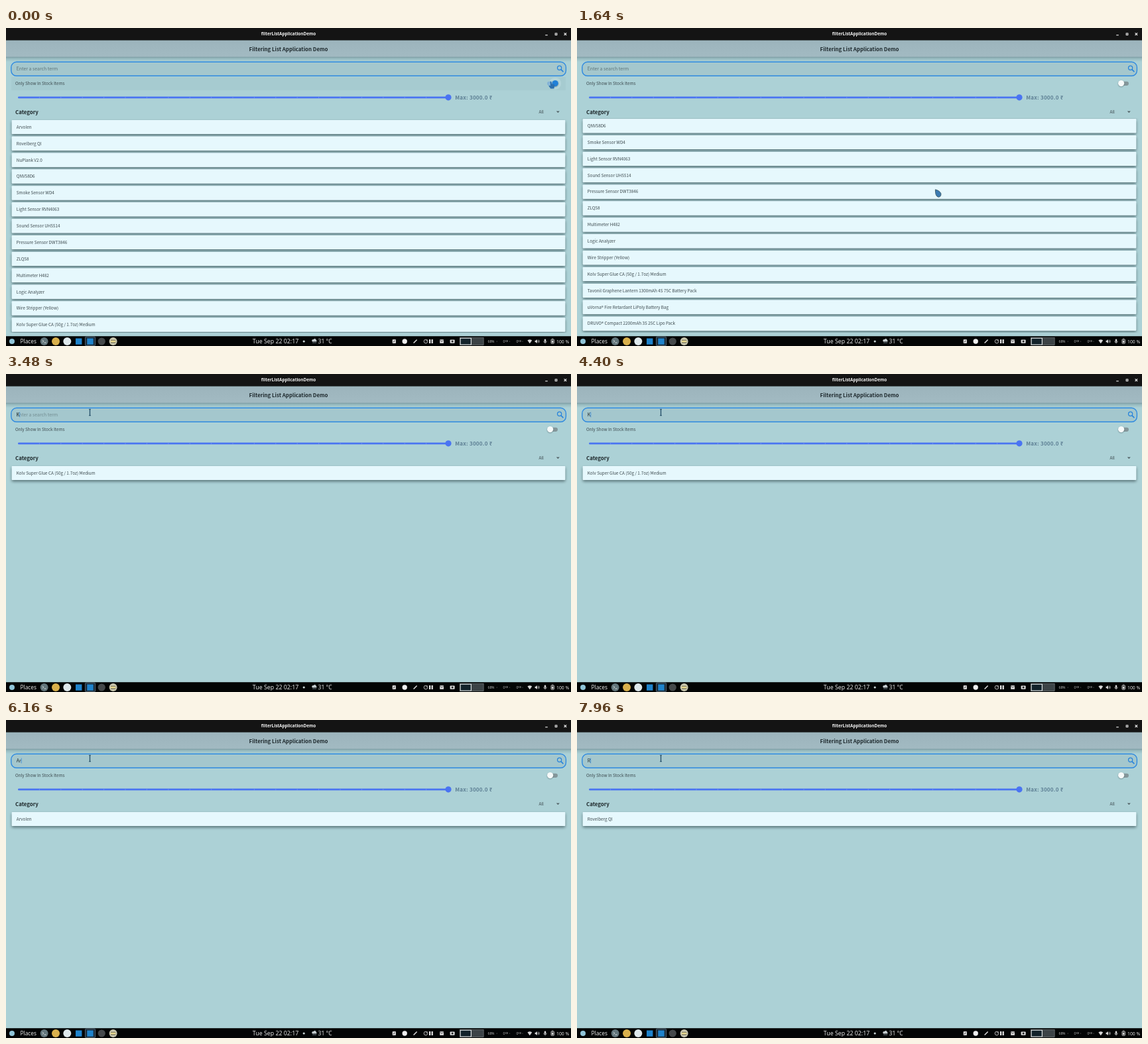
An HTML page with a canvas that plays this animation: 852x480 px, repeating every 8 s.

```html
<!DOCTYPE html>
<html lang="en">
<head>
<meta charset="utf-8">
<title>filterListApplicationDemo</title>
<style>
html, body { margin: 0; width: 100%; height: 100%; overflow: hidden; background: #acd1d6; }
canvas { display: block; width: 852px; height: 480px; }
</style>
</head>
<body>
<canvas id="stage"></canvas>
<script>
const W = 852, H = 480, LOOP = 8000;
const APP = '"Noto Sans CJK JP", "Noto Sans CJK SC", "Noto Sans", sans-serif';
const SYS = '"Noto Sans", "Open Sans", sans-serif';
const BLUE = '#4a74f2', INK = '#3b484c';

const items = [
  'Arvolen', 'Rovelberg QI', 'NuPlank V2.0', 'QNV58D6', 'Smoke Sensor WD4',
  'Light Sensor RVN4063', 'Sound Sensor UH5514', 'Pressure Sensor DWT3846',
  'ZLQ58', 'Multimeter H482', 'Logic Analyzer', 'Wire Stripper (Yellow)',
  'Kolv Super Glue CA (50g / 1.7oz) Medium',
  'Tavonil Graphene Lantern 1300mAh 4S 75C Battery Pack',
  'uVorna\u00ae Fire Retardant LiPoly Battery Bag',
  'DRUVO\u00ae Compact 2200mAh 3S 25C Lipo Pack'
];
const ROW = 24.87, SCROLL_END = 76.4;

// [time, query]
const typing = [
  [0, ''], [3420, 'K'], [5560, ''], [5880, 'A'], [6080, 'Ar'],
  [7000, 'A'], [7160, ''], [7560, 'R']
];
// [time, x, y]
const path = [
  [0, 822, 82], [160, 822, 82], [560, 545, 246], [1600, 545, 246],
  [2300, 127, 81], [2560, 127, 81], [2760, 126.5, 58]
];

const canvas = document.getElementById('stage');
const dpr = window.devicePixelRatio || 1;
canvas.width = W * dpr;
canvas.height = H * dpr;
const c = canvas.getContext('2d');

const clamp = v => Math.max(0, Math.min(1, v));
const ease = v => { v = clamp(v); return v * v * (3 - 2 * v); };
const span = (t, a, b) => ease((t - a) / (b - a));

function rect(x, y, w, h, color) {
  c.fillStyle = color;
  c.fillRect(x, y, w, h);
}

function round(x, y, w, h, r, fill, stroke, line = 1) {
  c.beginPath();
  c.roundRect(x, y, w, h, r);
  if (fill) { c.fillStyle = fill; c.fill(); }
  if (stroke) { c.strokeStyle = stroke; c.lineWidth = line; c.stroke(); }
}

function disc(x, y, r, fill) {
  c.beginPath();
  c.arc(x, y, r, 0, Math.PI * 2);
  c.fillStyle = fill;
  c.fill();
}

function lines(color, width, ...paths) {
  c.strokeStyle = color;
  c.lineWidth = width;
  c.beginPath();
  for (const p of paths)
    for (let i = 0; i < p.length; i += 2) i ? c.lineTo(p[i], p[i + 1]) : c.moveTo(p[0], p[1]);
  c.stroke();
}

function poly(color, ...p) {
  c.beginPath();
  for (let i = 0; i < p.length; i += 2) c.lineTo(p[i], p[i + 1]);
  c.closePath();
  c.fillStyle = color;
  c.fill();
}

function text(s, x, y, size, color, { bold = false, font = APP, align = 'left' } = {}) {
  c.font = `${bold ? 'bold ' : ''}${size}px ${font}`;
  c.textAlign = align;
  c.fillStyle = color;
  c.fillText(s, x, y);
}

function queryAt(t) {
  let i = 0;
  while (i + 1 < typing.length && typing[i + 1][0] <= t) i++;
  let start = i;
  while (start > 0 && !typing[start - 1][1] === !typing[i][1]) start--;
  const fade = start ? clamp((t - typing[start][0]) / 200) : 1;
  const query = typing[i][1];
  return { query, hint: query ? 1 - fade : fade };
}

function pointerAt(t) {
  let i = 0;
  while (i + 1 < path.length && path[i + 1][0] <= t) i++;
  const a = path[i], b = path[i + 1];
  if (!b) return [a[1], a[2]];
  const k = span(t, a[0], b[0]);
  return [a[1] + (b[1] - a[1]) * k, a[2] + (b[2] - a[2]) * k];
}

function drawTitleBar() {
  rect(0, 0, W, 18.6, '#141414');
  text('filterListApplicationDemo', 426, 11.4, 6.4, '#f4f4f4', { bold: true, font: SYS, align: 'center' });
  rect(813.2, 10.2, 3.6, 1.1, '#eee');
  c.strokeStyle = '#eee';
  c.lineWidth = 1.1;
  c.strokeRect(828.2, 8, 2.6, 2.6);
  lines('#eee', 1.1, [841.6, 7.4, 845.2, 11], [845.2, 7.4, 841.6, 11]);
}

function drawAppBar() {
  const shade = c.createLinearGradient(0, 43, 0, 51);
  shade.addColorStop(0, 'rgba(70,98,106,.55)');
  shade.addColorStop(0.4, 'rgba(70,98,106,.2)');
  shade.addColorStop(1, 'rgba(70,98,106,0)');
  rect(0, 43, W, 8, shade);
  const bar = c.createLinearGradient(0, 18, 0, 44);
  bar.addColorStop(0, '#9cb4bc');
  bar.addColorStop(1, '#a2bac2');
  rect(0, 18.6, W, 25, bar);
  text('Filtering List Application Demo', 426, 34.5, 7.86, '#1f2a2e', { bold: true, align: 'center' });
}

function drawSearch(t) {
  const { query, hint } = queryAt(t);
  round(7.8, 51.3, 836.6, 21, 8, '#a4c7cd', '#2f8ae0', 1.4);
  if (hint > 0) {
    c.globalAlpha = hint;
    text('Enter a search term', 15.7, 63.9, 6.93, '#5d7479');
    c.globalAlpha = 1;
  }
  if (query) text(query, 15.7, 63.9, 6.93, '#222e32');
  if (t > 2900) {
    c.font = `6.93px ${APP}`;
    rect(15.9 + c.measureText(query).width, 57.4, 0.8, 8, '#3b8bd8');
  }
  c.beginPath();
  c.arc(834.6, 60.3, 3.1, 0, Math.PI * 2);
  c.strokeStyle = '#2482dc';
  c.lineWidth = 1.2;
  c.stroke();
  lines('#2482dc', 1.5, [836.9, 62.6, 840.4, 66.1]);
}

function drawSwitch(t, hover) {
  if (hover) rect(8, 74, 836, 20, 'rgba(70,100,105,.05)');
  text('Only Show In Stock Items', 14, 86.2, 6.34, INK);
  const on = 1 - span(t, 60, 240);
  const x = 820.6 + 7.6 * on;
  round(816, 80.7, 16, 6.2, 3.1, on > 0.5 ? '#83b2d6' : '#83969a');
  if (on > 0) disc(x, 83.7, 9, `rgba(225,242,246,${0.25 * on})`);
  c.save();
  c.shadowColor = 'rgba(40,60,65,.5)';
  c.shadowBlur = 2 * dpr;
  c.shadowOffsetY = 0.7 * dpr;
  disc(x, 83.6, 4.6, on > 0.5 ? '#2180d8' : '#f6fafa');
  c.restore();
}

function drawSlider() {
  round(18, 103.6, 649, 2.6, 1.3, BLUE);
  for (let i = 1; i < 20; i++) disc(18 + i * 32.4, 104.9, 0.6, '#7f9df6');
  disc(667, 104.8, 4.6, BLUE);
  c.letterSpacing = '0.25px';
  text('Max: 3000.0 \u20b9', 677.2, 107.8, 8, '#5d7f94', { bold: true });
  c.letterSpacing = '0px';
}

function drawCategory() {
  text('Category', 14, 129.6, 7.85, '#1c2629', { bold: true });
  text('All', 803.4, 128.9, 6.33, INK);
  poly('#4c5b5f', 829.8, 125.4, 834.8, 125.4, 832.3, 128);
}

function drawList(t) {
  const { query } = queryAt(t);
  const shown = items.filter(s => s.toLowerCase().startsWith(query.toLowerCase()));
  const scroll = t < 3420 ? SCROLL_END * span(t, 560, 800) : 0;
  c.save();
  c.beginPath();
  c.rect(0, 136.5, W, 323.5);
  c.clip();
  shown.forEach((label, i) => {
    const y = 139 + i * ROW - scroll;
    if (y < 108 || y > 460) return;
    c.save();
    c.shadowColor = 'rgba(52,76,80,.72)';
    c.shadowBlur = 4 * dpr;
    c.shadowOffsetY = 2.2 * dpr;
    round(8.8, y, 834.4, 21, 0.8, '#e6f8fd');
    c.restore();
  });
  // faces go above the shadows of their neighbours
  shown.forEach((label, i) => {
    const y = 139 + i * ROW - scroll;
    round(8.8, y, 834.4, 21, 0.8, '#e6f8fd');
    text(label, 15.8, y + 12.8, 6.33, INK);
  });
  c.restore();
}

function drawPointer(x, y) {
  if (y < 73) {
    rect(x - 0.7, y - 5, 1.4, 10, '#28536c');
    rect(x - 1.5, y - 5.2, 3, 1, '#28536c');
    rect(x - 1.5, y + 4.2, 3, 1, '#28536c');
  } else if (y < 95) {
    c.save();
    c.translate(x, y);
    c.beginPath();
    c.moveTo(-1.6, -1);
    c.quadraticCurveTo(-0.6, -2.4, 0.5, -0.6);
    c.lineTo(0.9, 2.2);
    c.lineTo(4.2, 3);
    c.quadraticCurveTo(5.4, 3.4, 5.2, 5.4);
    c.lineTo(4.4, 9.6);
    c.lineTo(-0.8, 9.6);
    c.lineTo(-3.6, 5.6);
    c.quadraticCurveTo(-3.4, 4, -1.2, 5.2);
    c.closePath();
    c.fillStyle = x > 600 ? '#2c6fae' : '#3f5a69';
    c.fill();
    c.restore();
  } else {
    c.save();
    c.translate(x, y);
    c.beginPath();
    c.moveTo(-0.5, -0.5);
    c.quadraticCurveTo(6, 1.2, 8, 5.4);
    c.quadraticCurveTo(8.6, 10.6, 4, 10.8);
    c.quadraticCurveTo(-0.8, 9.8, -0.5, -0.5);
    c.fillStyle = '#3b7bb2';
    c.fill();
    c.strokeStyle = '#42616f';
    c.lineWidth = 1;
    c.stroke();
    c.restore();
  }
}

function drawLaunchers() {
  disc(9, 473, 4, '#8fc4d8');
  text('Places', 21.5, 476, 8.3, '#e4e4e4', { font: SYS });
  disc(57.6, 473, 6, '#62757b');
  lines('#e8eeee', 0.9, [54.8, 471, 56.8, 472.8, 54.8, 474.6], [57.6, 475, 60.4, 475]);
  disc(75, 473, 6, '#d9b04c');
  disc(92.3, 473, 6, '#dfe9ec');
  rect(105, 468.5, 9.4, 9.2, '#1f83cc');
  round(119.5, 466.2, 15, 13.4, 1, '#1b2b38', '#62788a', 0.8);
  rect(122.3, 468.5, 9.4, 9.2, '#1f83cc');
  disc(144.2, 473, 5.6, '#45494b');
  disc(161.6, 473, 6, '#c9c7ae');
  rect(158, 470.8, 7.2, 4.8, '#6d6a58');
  rect(158, 471.8, 7.2, 2.6, '#eadb92');
}

function drawTray() {
  round(582.6, 470, 5.4, 6, 1, '#d0d0d0');
  lines('#222', 0.8, [584, 474.4, 586.6, 471.6]);
  disc(601.2, 473, 3.7, '#f0f0f0');
  lines('#ddd', 1.5, [614.6, 475.6, 619.6, 470.4]);
  c.beginPath();
  c.arc(633, 473, 2.8, 0, Math.PI * 2);
  c.strokeStyle = '#c4c4c4';
  c.lineWidth = 0.9;
  c.stroke();
  lines('#c4c4c4', 0.8, [633, 473, 635.4, 470.6]);
  rect(638, 470, 2.2, 6, '#e6e6e6');
  rect(641.6, 470, 2.2, 6, '#e6e6e6');
  rect(654.2, 470.2, 5.8, 5.6, '#dcdcdc');
  lines('#222', 0.8, [654.4, 471, 657.1, 473.2, 659.8, 471]);
  round(669.6, 470.4, 7, 5.4, 0.8, '#dcdcdc');
  disc(673.1, 473.1, 1.5, '#222');

  rect(684.5, 467.6, 35.6, 11, '#3c4346');
  rect(684.5, 467.6, 17.4, 11, '#eef2f2');
  rect(685.6, 468.7, 15.2, 8.8, '#13232b');
  c.strokeStyle = '#8a9092';
  c.lineWidth = 0.6;
  c.strokeRect(684.5, 467.6, 35.6, 11);

  text('68%', 726.6, 475, 5, '#b8b8b8', { font: SYS });
  for (const x of [749.6, 769.4]) {
    text('0', x, 475, 5, '#b8b8b8', { font: SYS });
    text('KB', x + 3.2, 473.8, 3.4, '#b8b8b8', { font: SYS });
  }
  for (const x of [740.2, 759.6, 779]) disc(x, 473, 0.5, '#888');

  c.beginPath();
  c.moveTo(789.8, 476.2);
  c.lineTo(786.4, 471.6);
  c.quadraticCurveTo(789.8, 468.8, 793.2, 471.6);
  c.closePath();
  c.fillStyle = '#d8d8d8';
  c.fill();
  poly('#d8d8d8', 797.6, 471.8, 799, 471.8, 801, 470, 801, 476, 799, 474.2, 797.6, 474.2);
  c.strokeStyle = '#d8d8d8';
  c.lineWidth = 0.8;
  for (const r of [1.8, 3.4]) {
    c.beginPath();
    c.arc(800.8, 473, r, -0.8, 0.8);
    c.stroke();
  }
  round(811.8, 469.4, 2.4, 4.4, 1.2, '#d8d8d8');
  lines('#d8d8d8', 0.8, [810.8, 472.6, 811.4, 474.4, 814.6, 474.4, 815.2, 472.6], [813, 474.4, 813, 476.4]);
  round(822, 470, 4.4, 6.2, 0.6, null, '#d8d8d8', 0.9);
  rect(823, 471.6, 2.4, 3.6, '#d8d8d8');
  rect(823.3, 468.9, 1.8, 1, '#d8d8d8');
  text('100 %', 830, 475.5, 6.8, '#e4e4e4', { font: SYS });
}

function drawTaskbar() {
  rect(0, 465.2, W, 14.8, '#030505');
  drawLaunchers();
  text('Tue Sep 22  02:17'.replace('  ', ' '), 371.8, 476.1, 8.8, '#e4e4e4', { font: SYS });
  disc(449.2, 473, 1.6, '#c8d4d4');
  disc(463, 471.8, 1.7, '#c6cdd0');
  disc(465.6, 471.2, 2.1, '#c6cdd0');
  rect(461.8, 471.4, 6.6, 2, '#c6cdd0');
  lines('#9fb4c0', 0.7, [463.4, 474.2, 462.8, 476], [465.4, 474.2, 464.8, 476], [467.4, 474.2, 466.8, 476]);
  text('31 \u00b0C', 470.6, 476, 8.5, '#e4e4e4', { font: SYS });
  drawTray();
}

function draw(t) {
  c.setTransform(dpr, 0, 0, dpr, 0, 0);
  rect(0, 0, W, H, '#acd1d6');
  const [px, py] = pointerAt(t);
  drawAppBar();
  drawTitleBar();
  drawSearch(t);
  drawSwitch(t, py > 73 && py < 92);
  drawSlider();
  drawCategory();
  drawList(t);
  drawTaskbar();
  drawPointer(px, py);
}

const begin = performance.now();
function tick() {
  draw((performance.now() - begin) % LOOP);
  requestAnimationFrame(tick);
}
tick();
</script>
</body>
</html>
```
